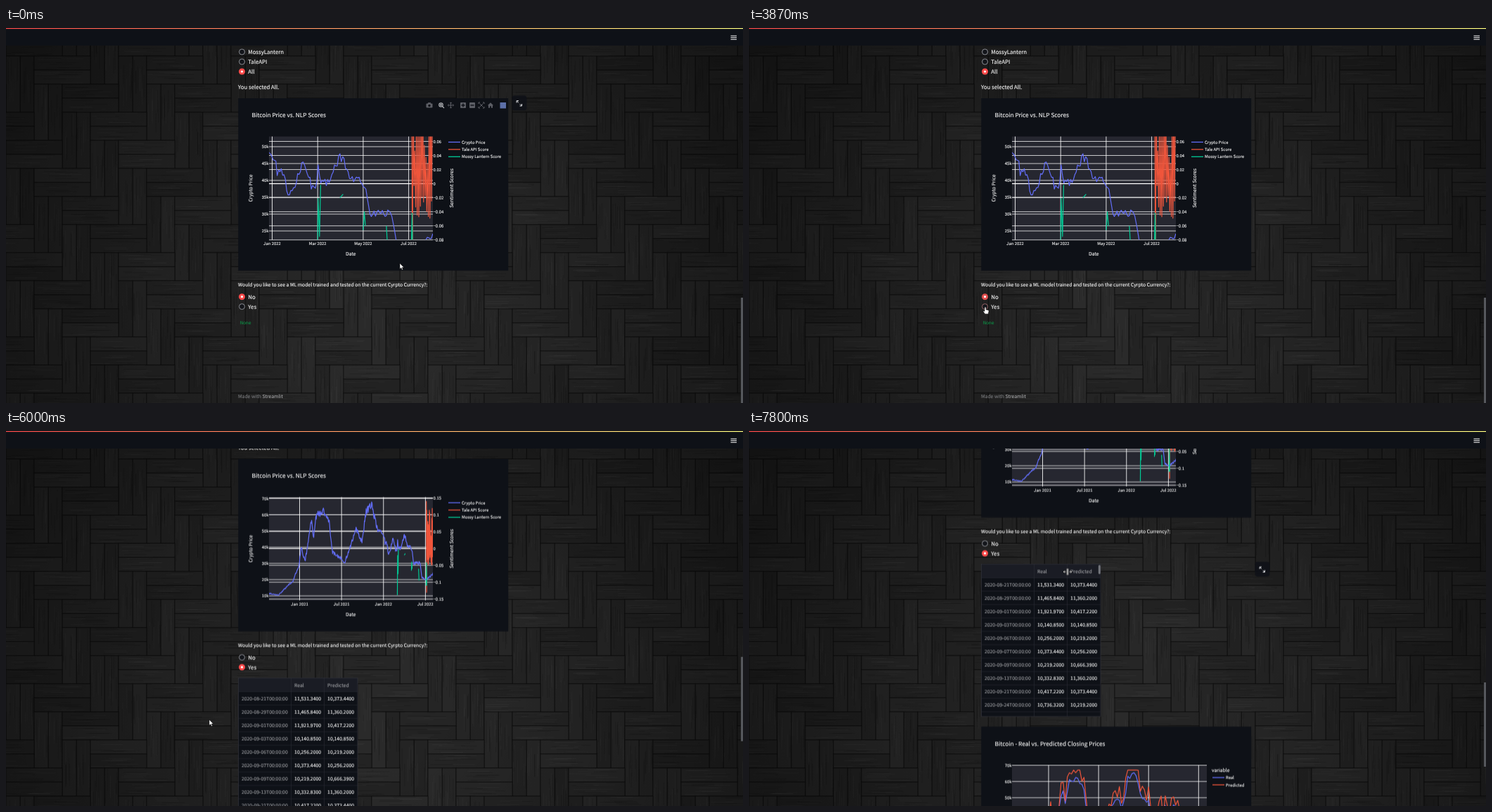
These frames come from a looping animation (1048x534 px, 8 s). An HTML page with a canvas:

```html
<!DOCTYPE html>
<html lang="en">
<head>
<meta charset="utf-8">
<title>Crypto dashboard</title>
<style>
html, body { margin: 0; width: 100%; height: 100%; overflow: hidden; background: #1b1b1b; }
canvas, svg { position: absolute; left: 0; top: 0; width: 1048px; height: 534px; }
text {
  font-family: "Noto Sans CJK JP", "Noto Sans CJK SC", "Noto Sans CJK", "Open Sans", sans-serif;
  text-rendering: geometricPrecision; white-space: pre;
}
.mono { font-family: "Noto Sans Mono", monospace; }
.page { animation: scroll 8s linear infinite; }
.thumb { animation: thumb 8s linear infinite; }
.cursor { animation: move 8s linear infinite; }

@keyframes scroll {
  0% { transform: translateY(4px); animation-timing-function: step-end; }
  59.8%, 72.4% { transform: none; }
  82.5% { transform: translateY(-218px); }
  83.3%, to { transform: translateY(-218.5px); }
}
@keyframes thumb {
  0%, 72.4% { transform: none; }
  82.5%, to { transform: translateY(49px); }
}
@keyframes move {
  0%, .6% { transform: translate(560px, 335px); }
  9% { transform: translate(711px, 130px); }
  10.8%, 11.2% { transform: translate(703px, 107px); }
  21.6% { transform: translate(324.5px, 369px); }
  24.8%, 67% { transform: translate(336px, 397px); }
  69.8%, 81.7% { transform: translate(289px, 411px); }
  82.5%, 83.6% { transform: translate(290px, 409px); }
  94.1%, 94.6% { transform: translate(461px, 204px); }
  97.4%, to { transform: translate(453px, 200.5px); }
}
</style>
</head>
<body>
<canvas id="wood" width="1048" height="534"></canvas>
<svg id="stage" viewBox="0 0 1048 534"></svg>
<script>
const LOOP = 8000;
const PANEL = '#0e1117', INK = '#fafafa', RED = '#ff4b4b';
const BLUE = '#636efa', ORANGE = '#ef553b', GREEN = '#00cc96';
const BODY = 8.73, SMALL = 7.64, TICK = 6.55, TITLE = 9.25;

function seeded(seed) {
  return () => (seed = (seed * 16807) % 2147483647) / 2147483647;
}

// Wood: herringbone of blocks, two planks each, lit from the lower middle
function drawWood() {
  const ctx = document.getElementById('wood').getContext('2d');
  const rnd = seeded(77), cell = 40, plank = cell / 2, len = cell * 2;

  function block(x, y, upright) {
    ctx.save();
    ctx.translate(x + (upright ? cell : 0), y);
    if (upright) ctx.rotate(Math.PI / 2);
    for (let top = 0; top < cell; top += plank) {
      const v = 35 + rnd() * 9 | 0;
      ctx.fillStyle = `rgb(${v},${v},${v})`;
      ctx.fillRect(0, top, len, plank);
      for (let n = 0; n < 10; n++) {
        ctx.fillStyle = rnd() < .5 ? 'rgba(0,0,0,.14)' : 'rgba(255,255,255,.03)';
        ctx.fillRect(rnd() * len * .5, top + rnd() * plank, len * .4, 1);
      }
      ctx.strokeStyle = 'rgba(8,8,8,.6)';
      ctx.strokeRect(0, top, len, plank);
    }
    ctx.restore();
  }

  for (let j = -2; j < 14; j++) {
    for (let i = -2; i < 27; i++) {
      const k = (i - j + 40) % 4;
      if (k === 0) block(i * cell, j * cell, false);
      if (k === 3) block(i * cell, j * cell, true);
    }
  }
  const light = ctx.createRadialGradient(540, 390, 80, 540, 390, 640);
  light.addColorStop(0, 'rgba(0,0,0,0)');
  light.addColorStop(1, 'rgba(0,0,0,.5)');
  ctx.fillStyle = light;
  ctx.fillRect(0, 0, 1048, 534);
}

// SVG helpers; text is placed by its vertical centre
const at = (x, y, s) => `<g transform="translate(${x} ${y})">${s}</g>`;
const group = (cls, ...kids) => `<g class="${cls}">${kids.join('')}</g>`;
const rect = (x, y, w, h, fill, extra = '') =>
  `<rect x="${x}" y="${y}" width="${w}" height="${h}" fill="${fill}" ${extra}/>`;
const path = (d, stroke, width = 1, fill = 'none') =>
  `<path d="${d}" stroke="${stroke}" stroke-width="${width}" fill="${fill}" stroke-linejoin="round"/>`;
const text = (x, y, s, size = BODY, fill = INK, anchor = 'start') =>
  `<text x="${x}" y="${(y + size * .33).toFixed(2)}" font-size="${(size / 1.117).toFixed(3)}" ` +
  `fill="${fill}" stroke="${fill}" stroke-width=".12" text-anchor="${anchor}">${s}</text>`;
const upright = (x, y, s) =>
  `<g transform="translate(${x} ${y}) rotate(-90)">${text(0, 0, s, SMALL, INK, 'middle')}</g>`;

// Shows its content from one time to another (ms), with fades of the given length
const rules = [];
function during(from, to, fade, ...kids) {
  const name = 'span' + rules.length, key = (t, o) => `${t / LOOP * 100}%{opacity:${o}}`;
  const rise = from ? key(0, 0) + key(from, 0) + key(from + fade, 1) : key(0, 1);
  const fall = to < LOOP ? key(to, 1) + key(to + fade, 0) + key(LOOP, 0) : key(LOOP, 1);
  rules.push(`@keyframes ${name}{${rise}${fall}}.${name}{animation:${name} 8s linear infinite}`);
  return group(name, ...kids);
}

const dot = (y, on, color = RED) => on
  ? `<circle cx="335.5" cy="${y}" r="4.5" fill="${color}"/><circle cx="335.5" cy="${y}" r="1.6" fill="#fff"/>`
  : `<circle cx="335.5" cy="${y}" r="4" fill="#14161b" stroke="${color === RED ? '#8c8e94' : color}"/>`;
const radio = (y, label, on) => dot(y, on) + text(344.3, y, label);

// Turning points of the price: months since January 2021, thousands
const TURNS = [[-4.4, 11.5], [-3, 10.5], [-1, 19], [-.1, 28], [.2, 40], [.8, 31], [1.7, 57], [2, 46],
  [2.4, 60], [3.4, 62], [4.2, 57], [4.7, 37], [6.5, 31], [8.1, 51], [8.9, 43], [9.5, 62], [10.3, 66],
  [11.2, 50], [11.9, 48], [12.05, 47], [12.25, 42], [12.45, 43], [12.7, 36], [13, 38], [13.25, 44],
  [13.5, 44], [13.75, 38], [13.92, 38], [14, 44], [14.2, 39], [14.45, 39], [14.93, 47], [15.14, 46],
  [15.36, 41], [15.7, 41], [16.07, 39], [16.3, 30], [17.25, 30.5], [17.45, 21.5], [18.2, 20], [19.1, 24]];

function priceAt(m) {
  const i = Math.max(1, TURNS.findIndex(p => p[0] >= m));
  const [m0, k0] = TURNS[i - 1], [m1, k1] = TURNS[i];
  return k0 + (k1 - k0) * (m - m0) / (m1 - m0);
}

function sample(from, to, step, value) {
  const pts = [];
  for (let m = from; m <= to; m += step) pts.push([m, value(m, pts.length)]);
  return pts;
}

const noise = seeded(9);
const PRICE = sample(-4.4, 19.06, .06, m => priceAt(m) * (1 + (noise() - .5) * .07));
const NEWS = sample(18.13, 19.06, .035, (m, i) =>
  i < 2 ? .14 - .27 * i : i % 2 ? -.05 * noise() : .02 + .1 * noise());
const VENDOR = [
  [[13.98, -.138], [14.02, -.021], [14.08, -.075], [14.13, -.002]],
  [[14.98, -.02], [15.12, -.015]],
  [[16, -.066], [16.05, -.04], [16.1, -.06]],
  [[17.02, -.06], [17.08, -.095]],
  [[18.1, -.11], [18.15, -.042], [18.18, -.11]]];

// A linear scale: value v0 sits at p0, one unit is `unit` pixels
const scale = (v0, p0, unit) => v => p0 + (v - v0) * unit;
const curve = (pts, x, y, color) =>
  path('M' + pts.map(([m, v]) => x(m).toFixed(1) + ' ' + y(v).toFixed(1)).join('L'), color, 1.2);
const ticks = (n, v, dv, pos, label) =>
  Array.from({ length: n }, (_, i) => [pos(v + dv * i), label(v + dv * i)]);
const kilo = v => v + 'k';
const score = v => String(+v.toFixed(2) || 0).replace('-', '\u2212');
const MONTHS = ['Jan', 'Mar', 'May', 'Jul'];
const month = m => `${MONTHS[m % 12 / 2]} ${2021 + Math.floor(m / 12)}`;

function plot(id, [x, y, w, h], xTicks, left, right, traces) {
  const x2 = x + w;
  let s = rect(x, y, w, h, '#262730');
  for (const [tx, label] of xTicks) {
    s += path(`M${tx} ${y}v${h}`, '#fff', .85) + text(tx, y + h + 5, label, TICK, INK, 'middle');
  }
  for (const [ty, label] of left) {
    s += path(`M${x} ${ty}H${x2}`, '#fff', .75) + text(x - .5, ty, label, TICK, INK, 'end');
  }
  for (const [ty, label] of right) {
    s += path(`M${x} ${ty}H${x2}`, '#fff', label === '0' ? 1.3 : .75) + text(x2 + .5, ty, label, TICK);
  }
  return `<clipPath id="${id}">${rect(x, y, w, h, '#fff')}</clipPath>` + s +
    `<g clip-path="url(#${id})">${traces.join('')}</g>`;
}

const traces = (x, price, mood) => [
  curve(PRICE, x, price, BLUE), curve(NEWS, x, mood, ORANGE),
  ...VENDOR.map(part => curve(part, x, mood, GREEN))];
const SCORE_BOX = [374, 150.5, 233, 147];

function zoomedPlot() {
  const x = scale(12, 378.5, 32.35), price = scale(50, 165, -4.8), mood = scale(0, 217.6, -1002);
  return plot('zoom-clip', SCORE_BOX, ticks(4, 12, 2, x, month), ticks(6, 50, -5, price, kilo),
    ticks(8, .06, -.02, mood, score), traces(x, price, mood));
}

function fullPlot() {
  const x = scale(0, 417.5, 9.94), price = scale(70, 152.5, -2.31), mood = scale(0, 223.6, -481);
  return plot('full-clip', SCORE_BOX, ticks(4, 0, 6, x, month), ticks(7, 70, -10, price, kilo),
    ticks(7, .15, -.05, mood, score), traces(x, price, mood));
}

function closingPlot() {
  const x = scale(0, 426, 11.85), price = scale(70, 694.5, -2.31);
  const real = sample(-4, 18.9, .25, m => priceAt(m) + noise() * 3 - 1.5);
  const guess = real.map(([m, k]) => [m, Math.min(67, k * 1.1 + 4 * Math.sin(m * 9))]);
  return plot('closing-clip', [374, 694, 277, 110], ticks(4, 0, 6, x, () => ''),
    ticks(3, 70, -10, price, kilo), [], [curve(real, x, price, BLUE), curve(guess, x, price, ORANGE)]);
}

const legend = (x, y, items) => items.map(([label, color], i) =>
  path(`M${x} ${y + i * 10.4}h17`, color, 1.3) + text(x + 19, y + i * 10.4, label, TICK)).join('');

function table() {
  const rows = ['08-21 11,531.3400 10,373.4400', '08-29 11,465.8400 11,360.2000',
    '09-01 11,921.9700 10,417.2200', '09-03 10,140.8500 10,140.8500',
    '09-06 10,256.2000 10,219.2000', '09-07 10,373.4400 10,256.2000',
    '09-09 10,219.2000 10,666.3900', '09-13 10,332.8300 11,360.2000',
    '09-21 10,417.2200 10,373.4400', '09-24 10,736.3200 10,219.2000'];
  const dim = '#9c9da1', edge = '#2a2c34', pitch = 19.08, top = 427.5;
  let s = rect(330.5, 408, 169.5, 217, PANEL) + rect(330.5, 408, 169.5, 19.5, '#1a1c24') +
    text(410, 418.2, 'Real', SMALL, dim) + text(457, 418.2, 'Predicted', SMALL, dim);
  rows.forEach((row, i) => {
    const [day, real, guess] = row.split(' '), y = top + pitch * i;
    s += path(`M330.5 ${y}h169.5`, edge, .6) +
      text(335, y + 9.6, `2020-${day}T00:00:00`, SMALL, dim) +
      text(448, y + 9.6, real, SMALL, INK, 'end') + text(495, y + 9.6, guess, SMALL, INK, 'end');
  });
  return s + path(`M330.5 ${top + pitch * 10}h169.5M405.5 408v217M452.5 408v217`, edge, .6) +
    rect(330.5, 408, 169.5, 217, 'none', 'stroke="#34363e" stroke-width=".7"');
}

const expand = y => rect(719.5, y - 11, 21, 21, PANEL, 'rx="4" opacity=".85"') +
  at(729.8, y, path('M-1-1L-3.3-3.3M-3.7-.8V-3.7H-.8M1 1L3.3 3.3M3.7.8V3.7H.8', '#e4e5e8', 1));

function toolbar() {
  const grey = '#5c5e65';
  const icon = (x, d, width = 1, color = grey) => at(x, 106, path(d, color, width));
  const key = (x, d) => rect(x - 4, 102, 8, 8, grey, 'rx="1"') + icon(x, d, 1.4, PANEL);
  return at(602, 106, rect(-4.5, -2.6, 9, 6.2, grey, 'rx="1"') + rect(-2, -3.8, 4, 2, grey) +
      `<circle cy=".5" r="1.7" fill="${PANEL}"/>`) +
    icon(619, 'M2.2-.5A2.7 2.7 0 1 1-3.2-.5A2.7 2.7 0 1 1 2.2-.5M1.6 1.6L4 4M-2-.5H1M-.5-2V1', 1.2, '#b4b6ba') +
    icon(632.5, 'M-4 0H4M0-4V4M-1.3-2.8L0-4.2 1.3-2.8M-1.3 2.8L0 4.2 1.3 2.8M-2.8-1.3L-4.2 0-2.8 1.3M2.8-1.3L4.2 0 2.8 1.3') +
    key(650, 'M-2.5 0H2.5M0-2.5V2.5') + key(663, 'M-2.5 0H2.5') +
    icon(676, 'M-4-2V-4H-2M4-2V-4H2M-4 2V4H-2M4 2V4H2M-2.5-2.5L2.5 2.5M2.5-2.5L-2.5 2.5') +
    at(689, 106, path('M-4.2.3L0-3.8 4.2.3H3V3.8H.9V1.3H-.9V3.8H-3V.3Z', 'none', 0, grey)) +
    rect(702.5, 102, 8.5, 8.5, '#5d70a8');
}

function page() {
  const no = 378.7, yes = 392.7;
  const chart = rect(330.3, 96, 383.9, 245.5, PANEL) +
    text(349.5, 120, 'Bitcoin Price vs. NLP Scores', TITLE) +
    during(0, 4185, 1, zoomedPlot()) + during(4185, LOOP, 1, fullPlot()) +
    text(490.3, 317.8, 'Date', SMALL, INK, 'middle') +
    upright(347.3, 224, 'Crypto Price') + upright(633, 224, 'Sentiment Scores') +
    legend(629, 158.5, [['Crypto Price', BLUE], ['Tale API Score', ORANGE], ['Mossy Lantern Score', GREEN]]);

  const closing = rect(330.3, 639.5, 383.9, 245, PANEL) +
    text(349.5, 663.7, 'Bitcoin - Real vs. Predicted Closing Prices', TITLE) + closingPlot() +
    text(658, 701.5, 'variable', SMALL) + legend(659, 712, [['Real', BLUE], ['Predicted', ORANGE]]);

  return group('page',
    radio(30, 'MossyLantern', false), radio(44, 'TaleAPI', false), radio(58, 'All', true),
    text(330, 80.5, 'You selected All.'),
    chart, during(0, 1780, 200, toolbar(), expand(103.3)),
    text(330, 361.3, 'Would you like to see a ML model trained and tested on the current Cyrpto Currency?:', SMALL),
    text(344.3, no, 'No'), text(344.3, yes, 'Yes'),
    during(0, 3855, 1, dot(no, true), dot(yes, false)),
    during(3855, 4185, 1, dot(no, true, '#e2504f'), dot(yes, false, '#9b6668')),
    during(4185, LOOP, 1, dot(no, false), dot(yes, true)),
    during(0, 4350, 430, '<text class="mono" x="333" y="418.2" font-size="6.5" fill="#09a04a">None</text>'),
    during(0, 4785, 1, text(330, 520, 'Made with <tspan fill="#b9babc" stroke="none">Streamlit</tspan>', SMALL, '#77787b')),
    during(4785, LOOP, 1, table(), closing),
    during(6950, LOOP, 180, expand(415.8), rect(496.8, 409.3, 3, 13, '#73757b', 'rx="1.5"')));
}

const header = () =>
  '<linearGradient id="bar"><stop stop-color="#ff4b4b"/><stop offset="1" stop-color="#fffd80"/></linearGradient>' +
  rect(0, 0, 1048, 25, PANEL) + rect(0, 0, 1048, 1.2, 'url(#bar)') +
  path('M1030.5 11.2h8.5M1030.5 13.7h8.5M1030.5 16.2h8.5', INK, 1) +
  during(4360, 4980, 80,
    at(939, 13.5, '<circle cx="1.5" cy="-4.5" r="1.3" fill="#fafafa"/>' +
      path('M1-2.5L-.5 1.2 2 3 1.2 6M-.5 1.2L-2 4H-4.5M-3-.5L-1-2.5H1L2.5 0H4', INK, 1)),
    text(948, 13.5, 'Running...', SMALL), text(999.5, 13.5, 'Stop', SMALL));

const scrollbar = () =>
  during(0, 4785, 1, rect(1045, 384, 3, 150, '#55575c')) +
  during(4785, LOOP, 1, group('thumb', rect(1045, 309, 3, 120, '#55575c')));

function cursor() {
  const arrow = path('M0 0V8.2L1.9 6.5 3.2 9.4 4.5 8.8 3.2 6H5.8Z', '#000', .5, '#fff');
  const hand = path('M-1 1Q0-.6 1 1V4L4.2 4.8Q5.1 5.1 5 6.5L4.2 10.2H-.5L-3 6.6Q-3.2 5.4-2 5.8L-1 6.6Z', '#000', .5, '#fff');
  const bars = 'M-.8-4.5V4.5M.8-4.5V4.5M-2.5 0H-5.5M-4.2-1.5L-5.7 0-4.2 1.5M2.5 0H5.5M4.2-1.5L5.7 0 4.2 1.5';
  return group('cursor',
    during(0, 1920, 1, arrow), during(1920, 5440, 1, hand), during(5440, 7660, 1, arrow),
    during(7660, LOOP, 1, path(bars, '#000', 1.8), path(bars, '#fff', .9)));
}

drawWood();
document.getElementById('stage').innerHTML = page() + header() + scrollbar() + cursor();
document.querySelector('style').append(rules.join('\n'));
</script>
</body>
</html>
```
